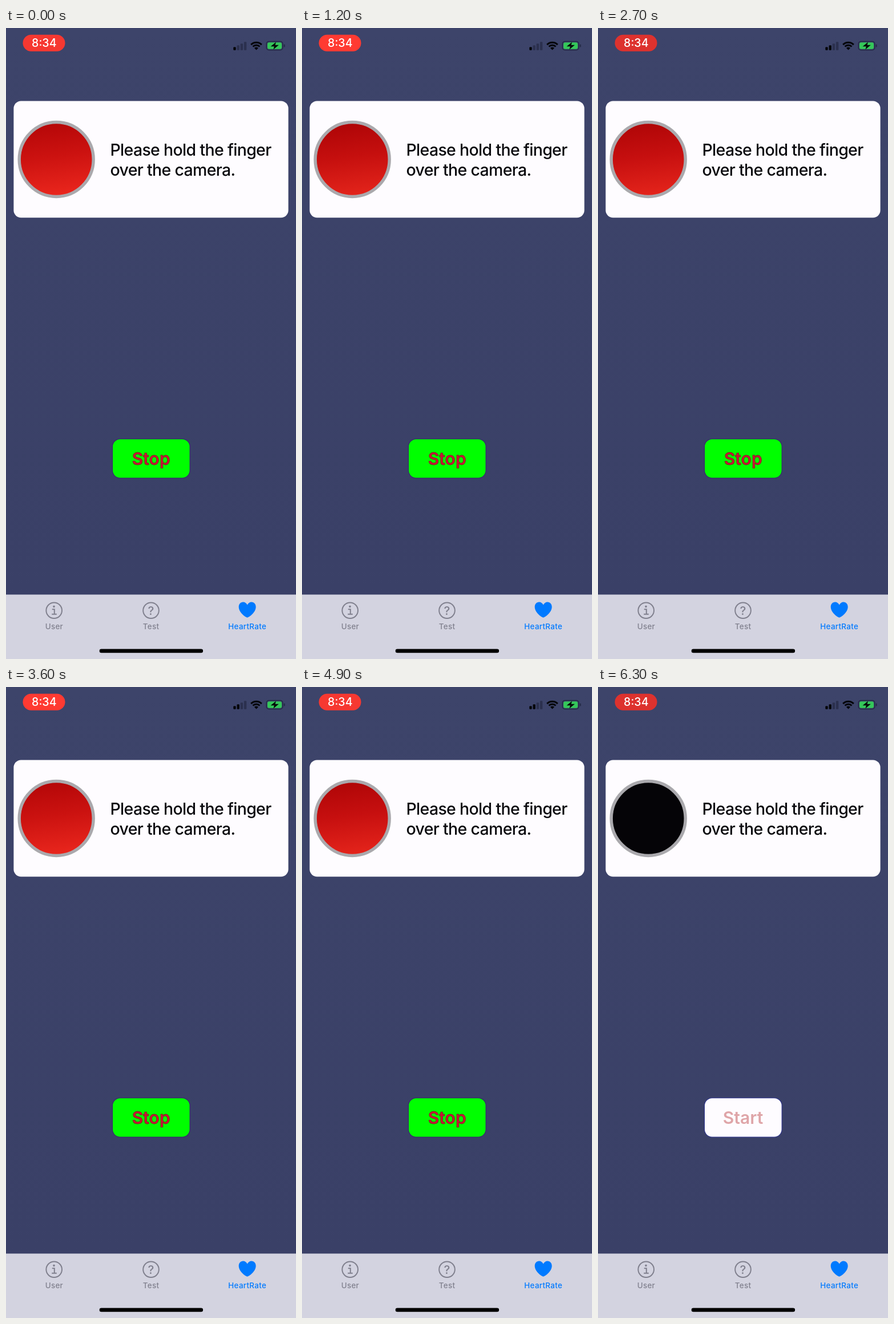
An HTML page with a canvas for the animation above (6.4 s loop, 508 by 1102 pixels).

```html
<!DOCTYPE html>
<html lang="en">
<head>
<meta charset="utf-8">
<title>Heart rate</title>
<style>
  html, body { margin: 0; width: 100%; height: 100%; overflow: hidden; background: #3c4369; }
  canvas { display: block; width: 508px; height: 1102px; }
</style>
</head>
<body>
<canvas id="stage"></canvas>
<script>
const W = 508, H = 1102, LOOP = 6400, STEP = 100;
const BARS_AT = 1600, STOP_AT = 6300;
const FONT = 'Inter, Roboto, sans-serif';
const canvas = document.getElementById('stage');
const ctx = canvas.getContext('2d');
const dpr = window.devicePixelRatio || 1;
canvas.width = W * dpr;
canvas.height = H * dpr;
ctx.scale(dpr, dpr);

const clamp = v => Math.min(1, Math.max(0, v));
const wave = (t, period, peak) => Math.cos((t - peak) / period * 2 * Math.PI);

function mix(a, b, k) {
  return `rgb(${a.map((v, i) => Math.round(v + (b[i] - v) * k)).join(',')})`;
}

function box(x, y, w, h, r, fill) {
  ctx.beginPath();
  ctx.roundRect(x, y, w, h, r);
  ctx.fillStyle = fill;
  ctx.fill();
}

function disc(x, y, r, fill) {
  ctx.beginPath();
  ctx.arc(x, y, r, 0, 2 * Math.PI);
  ctx.fillStyle = fill;
  ctx.fill();
}

function ring(x, y, r, width, color) {
  ctx.beginPath();
  ctx.arc(x, y, r, 0, 2 * Math.PI);
  ctx.lineWidth = width;
  ctx.strokeStyle = color;
  ctx.stroke();
}

function label(str, x, y, size, weight, color, align = 'center', spacing = 0) {
  ctx.font = `${weight} ${size}px ${FONT}`;
  ctx.letterSpacing = spacing + 'px';
  ctx.textAlign = align;
  ctx.fillStyle = color;
  ctx.fillText(str, x, y);
}

function background() {
  const g = ctx.createLinearGradient(0, 0, 0, 990);
  g.addColorStop(0, '#3d446a');
  g.addColorStop(1, '#3a4067');
  ctx.fillStyle = g;
  ctx.fillRect(0, 0, W, H);
}

function signal(active) {
  for (let i = 0; i < 4; i++) {
    const h = 5.5 + i * 3;
    box(398.3 + i * 6.2, 38.7 - h, 4.4, h, 1.2, i < active ? '#05060a' : '#2b304e');
  }
}

function wifi() {
  const cx = 438.5, cy = 38.5, a = Math.PI * 0.25;
  ctx.strokeStyle = '#05060a';
  ctx.lineWidth = 3;
  for (const r of [13.2, 8.4]) {
    ctx.beginPath();
    ctx.arc(cx, cy, r, -Math.PI + a, -a);
    ctx.stroke();
  }
  ctx.beginPath();
  ctx.moveTo(cx, cy);
  ctx.arc(cx, cy, 5, -Math.PI + a, -a);
  ctx.fillStyle = '#05060a';
  ctx.fill();
}

function battery() {
  box(455.5, 22.8, 30, 16.4, 5, '#242a45');
  box(457, 24.3, 27, 13.4, 3.5, '#3a4466');
  box(458, 25.2, 25, 11.6, 3, '#35c75a');
  box(486.6, 28.5, 2, 5, 1, '#242a45');
  ctx.beginPath();
  ctx.moveTo(473, 24.6);
  ctx.lineTo(463.6, 32.2);
  ctx.lineTo(469.8, 32.2);
  ctx.lineTo(468.4, 37.6);
  ctx.lineTo(477.8, 29.8);
  ctx.lineTo(471.6, 29.8);
  ctx.closePath();
  ctx.fillStyle = '#05060a';
  ctx.fill();
}

function statusBar(t) {
  const glow = clamp(0.5 + 0.9 * wave(t, 1900, 1500));
  box(29.5, 11.8, 74, 29, 14.5, mix([221, 50, 46], [255, 58, 50], glow));
  label('8:34', 66.8, 33.4, 19.6, 500, '#fff');
  signal(t < BARS_AT ? 1 : 2);
  wifi();
  battery();
}

function camera(t, running) {
  const x = 88.2, y = 229.5, r = 63;
  if (running) {
    const beat = 0.5 + 0.5 * wave(t, 733, 0);
    const g = ctx.createLinearGradient(x - 8, y - r, x + 8, y + r);
    g.addColorStop(0, mix([174, 5, 7], [182, 7, 8], beat));
    g.addColorStop(0.45, mix([196, 14, 14], [204, 18, 16], beat));
    g.addColorStop(1, mix([225, 35, 26], [234, 38, 29], beat));
    disc(x, y, r, g);
  } else {
    disc(x, y, r, '#050407');
  }
  ring(x, y, 65, 5.4, '#aaa9ad');
}

function card(t, running) {
  box(13.4, 127.4, 481.2, 203.8, 13, '#fefcff');
  camera(t, running);
  label('Please hold the finger', 182.5, 223, 28.5, 500, '#0b0b0f', 'left', -0.68);
  label('over the camera.', 182.5, 258, 28.5, 500, '#0b0b0f', 'left', -0.68);
}

function button(running) {
  box(186, 717.2, 136.6, 69.4, 14, running ? '#37206f' : '#2d3391');
  box(187, 718.2, 134.6, 67.4, 13, running ? '#00ff00' : '#fefcff');
  if (running) {
    label('Stop', 254.2, 763.2, 30, 600, '#cb1436');
    ctx.lineWidth = 0.8;
    ctx.strokeStyle = 'rgba(110,30,25,.75)';
    ctx.strokeText('Stop', 254.2, 763.2);
  } else {
    label('Start', 254, 763.2, 30, 600, '#dfa5a8');
  }
}

function infoIcon(x, y, color) {
  ring(x, y, 13.8, 2, color);
  disc(x - 0.2, y - 6.8, 1.8, color);
  ctx.beginPath();
  ctx.moveTo(x - 3.4, y - 2);
  ctx.lineTo(x + 0.6, y - 2);
  ctx.lineTo(x + 0.6, y + 6.6);
  ctx.moveTo(x - 4, y + 6.6);
  ctx.lineTo(x + 4.6, y + 6.6);
  ctx.lineWidth = 2;
  ctx.stroke();
}

function heart(x, y, color) {
  ctx.beginPath();
  ctx.moveTo(x, y + 13);
  for (const s of [-1, 1]) {
    ctx.moveTo(x, y + 13);
    ctx.bezierCurveTo(x + s * 3, y + 13, x + s * 15, y + 4, x + s * 15, y - 5.5);
    ctx.bezierCurveTo(x + s * 15, y - 10.5, x + s * 11.5, y - 14, x + s * 7.5, y - 14);
    ctx.bezierCurveTo(x + s * 4, y - 14, x + s * 1.5, y - 12, x, y - 9);
    ctx.closePath();
  }
  ctx.fillStyle = color;
  ctx.fill();
  ctx.fillRect(x - 0.5, y - 8.5, 1, 21);
}

function tabBar() {
  const grey = '#80808e', blue = '#007aff';
  ctx.fillStyle = '#d3d3e0';
  ctx.fillRect(0, 989.5, W, H - 989.5);
  infoIcon(84.2, 1017.2, grey);
  ring(254, 1017.2, 13.8, 2, grey);
  label('?', 254, 1024.6, 20.5, 500, grey);
  heart(422.7, 1016.6, blue);
  label('User', 84.4, 1050.4, 13.4, 500, grey, 'center', 0.3);
  label('Test', 254, 1050.4, 13.4, 500, grey, 'center', 0.3);
  label('HeartRate', 422.7, 1050.4, 13.4, 500, blue, 'center', 0.3);
  box(163.7, 1084.6, 181.4, 6.6, 3.3, '#000');
}

function draw(t) {
  const running = t < STOP_AT;
  background();
  statusBar(t);
  card(t, running);
  button(running);
  tabBar();
}

let start;
function tick(now) {
  start ??= now;
  const t = (now - start) % LOOP;
  draw(Math.floor((t + 2) / STEP) * STEP % LOOP);
  requestAnimationFrame(tick);
}
draw(0);
requestAnimationFrame(tick);
</script>
</body>
</html>
```
